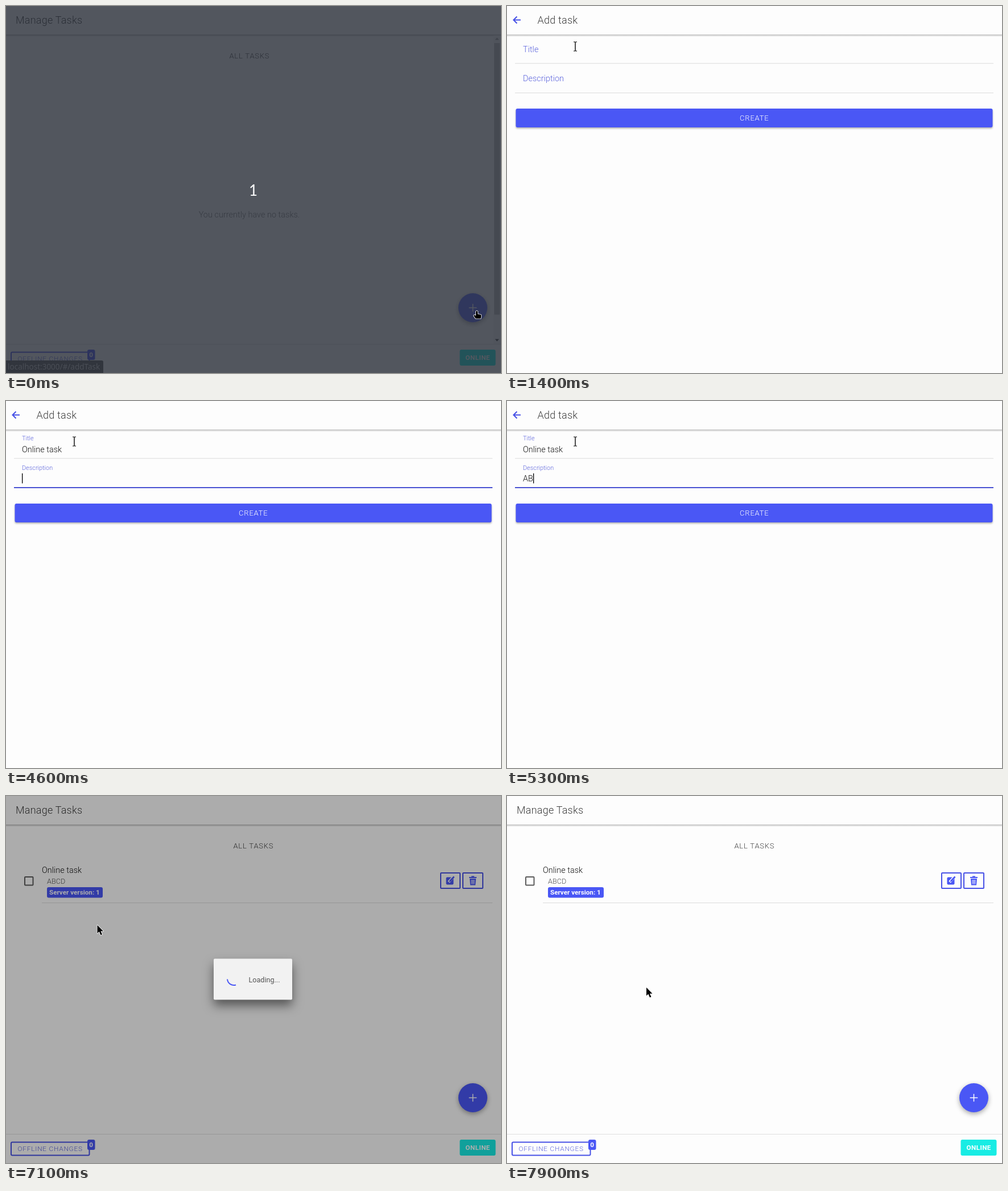
Recreate the animation shown at these times as an HTML page. Size 870x644 px, loop 8 s.

```html
<!DOCTYPE html>
<html lang="en">
<head>
<meta charset="utf-8">
<title>Manage Tasks</title>
<style>
  html, body { margin: 0; width: 100%; height: 100%; overflow: hidden; background: #fdfdfd; }
  svg { display: block; width: 870px; height: 644px; }
  text { font: 300 14.4px Roboto, sans-serif; white-space: pre; fill: #111; letter-spacing: .05px; }
  .title { font-size: 18px; fill: #3c3c3c; letter-spacing: .225px; }
  .caps { font-size: 13px; letter-spacing: .8px; }
  .small { font-size: 12.6px; fill: #555; }
  .bold { font-weight: 700; font-size: 11.7px; fill: #fff; letter-spacing: 0; }
  .mid { text-anchor: middle; }
  .label { fill: #5a62dc; }
  .blue { fill: #4a57f5; }
  .line { fill: none; stroke: #4751e6; stroke-width: 2; }
  .raised { filter: drop-shadow(0 2px 1.5px rgba(0,0,0,.3)); }
  #fab { filter: drop-shadow(0 3px 4px rgba(0,0,0,.35)); }
  #popup { filter: drop-shadow(0 10px 9px rgba(0,0,0,.5)); }
  .cursor { fill: #000; stroke: #fff; stroke-width: 1.6; paint-order: stroke; stroke-linejoin: round; }
</style>
</head>
<body>
<svg viewBox="0 0 870 644">
  <defs>
    <linearGradient id="shade" x2="0" y2="1">
      <stop stop-color="#bbb"/><stop offset="1" stop-color="#bbb" stop-opacity="0"/>
    </linearGradient>
    <g id="page">
      <rect width="870" height="644" fill="#fdfdfd"/>
      <rect y="50" width="870" height="4" fill="url(#shade)"/>
    </g>
  </defs>

  <g id="list">
    <use href="#page"/>
    <text class="title" x="17" y="31">Manage Tasks</text>
    <text class="caps mid" id="heading" y="91.5" fill="#444" style="fill:#444">ALL TASKS</text>

    <g id="empty">
      <text class="mid" x="427.5" y="370.5" style="fill:#777">You currently have no tasks.</text>
      <rect x="857" y="52" width="13" height="541" fill="#f1f1f1"/>
      <rect x="858" y="65" width="10" height="476.5" fill="#bdbdbd"/>
      <path d="M859.5 59.5h7l-3.500-4z" fill="#a0a0a0"/>
      <path d="M859.500 584.500h7l-3.500 4z" fill="#444"/>
    </g>

    <g id="item">
      <rect x="33" y="142" width="14.500" height="14.500" rx="1" fill="none" stroke="#5c5c5c" stroke-width="2"/>
      <text x="63" y="134.500">Online task</text>
      <text class="small" x="72" y="153.500">ABCD</text>
      <rect class="blue" x="72" y="160" width="98" height="18.500" rx="3"/>
      <text class="bold" x="76" y="173">Server version: 1</text>
      <path d="M63 187.500H855" stroke="#dcdcdc"/>
      <rect class="line" x="764" y="135" width="34" height="27" rx="1"/>
      <rect class="line" x="803" y="135" width="35" height="27" rx="1"/>
      <rect class="blue" x="773.500" y="142.500" width="13" height="13" rx="2"/>
      <path d="M778 151l9.500-10.500" stroke="#fff" stroke-width="4.500"/>
      <path d="M778.500 151l1-3 7-7.500 2 2-7 7.500z" class="blue"/>
      <path d="M814 142h4v-1.500h5v1.500h4v2h-13zM815 145h11l-1 11.500h-9z" class="blue"/>
      <path d="M818.300 147v7.500M820.500 147v7.500M822.700 147v7.500" stroke="#fff"/>
    </g>

    <circle id="fab" cx="820.500" cy="529.500" r="25.500"/>
    <path d="M813.700 529.500h13.600M820.500 522.700v13.600" stroke="#fff" stroke-width="1.500"/>

    <path d="M0 593.500H870" stroke="#dedede"/>
    <rect class="line" x="9" y="607.500" width="137.500" height="23" rx="2"/>
    <text class="label" x="20.500" y="623" style="font-size:11.800px;letter-spacing:.8px">OFFLINE CHANGES</text>
    <rect class="blue" x="143" y="603" width="13.500" height="18" rx="3"/>
    <text class="bold mid" x="149.700" y="616">0</text>
    <rect x="797.500" y="603" width="63" height="28" rx="3" fill="#18ece4"/>
    <text class="bold mid" x="829.200" y="621" style="letter-spacing:.4px">ONLINE</text>
  </g>

  <g id="add">
    <use href="#page"/>
    <path class="line" d="M24 24.500H12M17.500 18.500l-6 6 6 6" stroke-width="1.800"/>
    <text class="title" x="53.500" y="31">Add task</text>
    <text class="label" id="titleLabel" x="28">Title</text>
    <text id="titleText" x="28" y="90"></text>
    <rect id="titleRule" x="14" width="841"/>
    <text class="label" id="descLabel" x="28">Description</text>
    <text id="descText" x="28" y="141"></text>
    <rect id="descRule" x="14" width="841"/>
    <rect id="caret" width="1.300" height="17.500"/>
    <rect class="raised" id="create" x="15.500" y="180" width="838" height="33" rx="3"/>
    <text class="caps mid" x="434.800" y="201.300" style="fill:#fff">CREATE</text>
  </g>

  <g id="status">
    <path d="M0 622H168q3 0 3 3V644H0z" fill="#5e5e5e"/>
    <text x="3" y="638" style="font:13.500px 'Noto Sans',sans-serif;fill:#d2d2d2;letter-spacing:0">localhost:3000/#/addTask</text>
  </g>

  <rect id="backdrop" width="870" height="644"/>
  <g id="popup">
    <rect x="-69" y="-36" width="138" height="72" rx="2" fill="#f2f2f2"/>
    <path d="M-45 0A11.500 11.500 0 0 0 -30 10" fill="none" stroke="#4a57f5" stroke-width="2"/>
    <text x="-7.500" y="5" style="font-size:12.600px;font-weight:400;fill:#555;letter-spacing:0">Loading...</text>
  </g>

  <g id="countdown">
    <rect width="870" height="644" fill="#262b34" opacity=".79"/>
    <text class="mid" x="434.500" y="333" style="font:26px Lato,sans-serif;fill:#fff">1</text>
  </g>

  <g id="pointer">
    <path class="cursor" id="arrow" d="M0 0V14.500L3.300 11.500 6 17.500 8.500 16.400 5.900 10.700H10.500z"/>
    <path class="cursor" id="beam" d="M-3-8.500h2.300l.7.500.7-.5H3v1H.7v15H3v1H.700l-.7-.5-.7.500H-3v-1h2.300v-15H-3z"/>
    <path class="cursor" id="hand" d="M-2 1Q-.5-.800 1 1V5.500L6.500 6.700Q7.500 7 7.300 9L6.500 13.500H-2.500L-6 8.500Q-5.500 6.500-3.500 7.500L-2 8.500z"/>
  </g>
</svg>

<script>
const LOOP = 8000, STEP = 100;
const $ = id => document.getElementById(id);
const set = (id, attrs) => { for (const k in attrs) $(id).setAttribute(k, attrs[k]); };
const show = (id, on) => { $(id).style.display = on ? '' : 'none'; };
const clamp = v => Math.min(1, Math.max(0, v));
const mix = (a, b, p) => a + (b - a) * p;

// [time, x, y]
const path = [
  [0, 828, 535], [500, 828, 535], [900, 195, 215], [1000, 195, 215], [1100, 177, 125],
  [1200, 177, 125], [1300, 150, 38], [1400, 120, 71], [6100, 120, 71], [6700, 248, 200],
  [7000, 248, 200], [7200, 73, 253], [7700, 41, 333], [7900, 245, 336], [LOOP, 245, 336]
];
const titleKeys = [2200, 2400, 2600, 2800, 2900, 3000, 3100, 3700, 3700, 4000, 4100];
const descKeys = [5300, 5300, 5600, 5800];

function pointerAt(t) {
  const i = path.findIndex(k => k[0] > t), [t0, x0, y0] = path[i - 1], [t1, x1, y1] = path[i];
  const p = (t - t0) / (t1 - t0);
  return [mix(x0, x1, p), mix(y0, y1, p)];
}

const typed = (text, keys, t) => text.slice(0, keys.filter(k => k <= t).length);

function label(id, floated, baseline) {
  set(id, { y: mix(baseline, baseline - 11.700, floated) });
  $(id).style.fontSize = mix(14.4, 10.8, floated) + 'px';
}

function rule(id, y, focused) {
  set(id, focused ? { y: y - 1, height: 2, fill: '#4a52d2' } : { y, height: 1, fill: '#dcdcdc' });
}

function draw(t) {
  const [x, y] = pointerAt(t);
  const onAdd = t >= 500 && t < 7100;
  const overFab = !onAdd && Math.hypot(x - 820.5, y - 529.5) < 25;
  const overCreate = onAdd && y > 180 && y < 213;
  const kind = overFab || overCreate ? 'hand' : onAdd && y > 52 && y < 153 ? 'beam' : 'arrow';
  for (const id of ['arrow', 'beam', 'hand']) show(id, id === kind);
  set('pointer', { transform: `translate(${x} ${y})` });

  const filled = t >= 7100;
  show('empty', !filled);
  show('item', filled);
  set('heading', { x: filled ? 434.9 : 427.9 });
  set('fab', { fill: overFab ? '#5c68f7' : '#4a57f5' });

  // page slides up while it fades in
  const enter = 1 - (1 - clamp((t - 400) / 280)) ** 3;
  show('add', t > 400 && onAdd);
  set('add', { opacity: enter, transform: `translate(0 ${40 * (1 - enter)})` });

  const focus = t < 1500 || t >= 6900 ? '' : t < 4600 ? 'title' : 'desc';
  label('titleLabel', clamp((t - 1400) / 200), 81);
  label('descLabel', t >= 4600 ? 1 : 0, 132.2);
  $('titleText').textContent = typed('Online task', titleKeys, t);
  $('descText').textContent = typed('ABCD', descKeys, t);
  rule('titleRule', 100.3, focus === 'title');
  rule('descRule', 152, focus === 'desc');
  show('caret', focus);
  if (focus && onAdd) {
    const end = $(focus + 'Text').getComputedTextLength();
    set('caret', { x: Math.round(28 + end), y: focus === 'title' ? 76 : 127 });
  }
  set('create', { fill: overCreate ? '#5c68f5' : '#4a57f5' });

  show('status', t < 700);
  show('countdown', t < 300);

  const loading = t < 7100 ? 0 : t < 7200 ? 1 : t < 7300 ? .62 : 0;
  set('backdrop', { opacity: .32 * loading });
  show('popup', loading);
  set('popup', { opacity: loading, transform: `translate(434 321.500) scale(${.9 + .1 * loading})` });
}

const start = performance.now();
function tick() {
  const t = (performance.now() - start + 1) % LOOP;
  draw(Math.floor(t / STEP) * STEP);
  requestAnimationFrame(tick);
}
tick();
</script>
</body>
</html>
```
